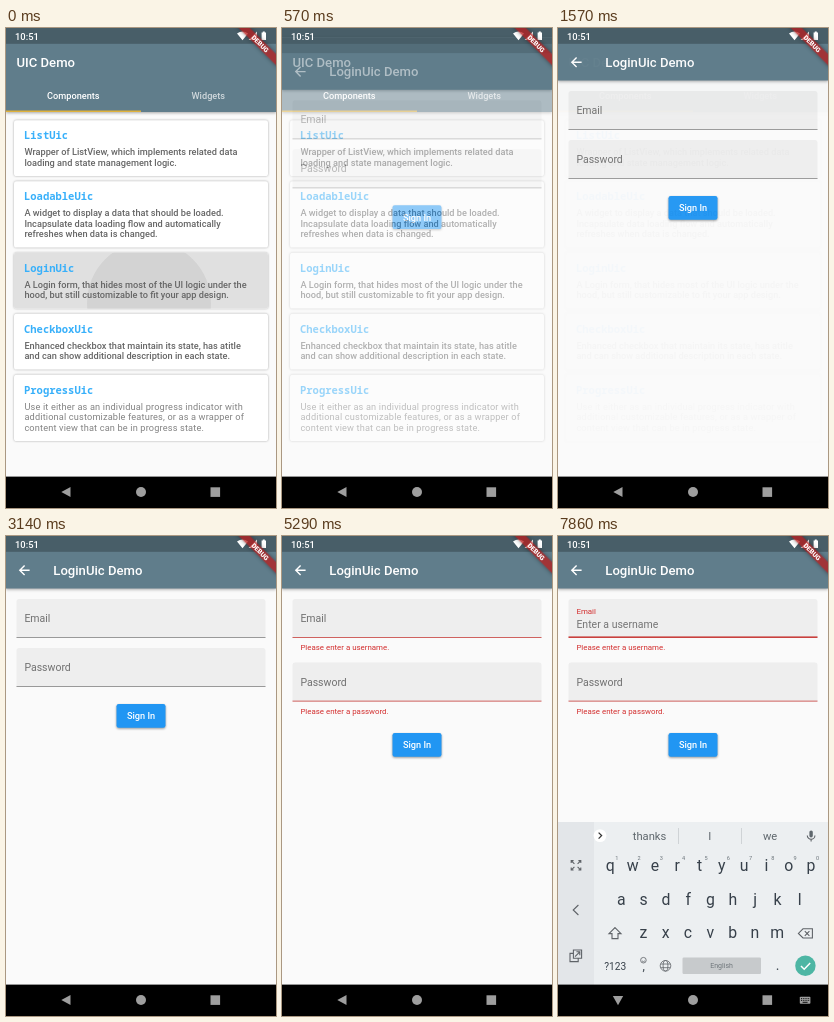
Write an HTML page that moves like this. It is 270x480 px and loops after 8000 ms.

```html
<!DOCTYPE html>
<html lang="en">
<head>
<meta charset="utf-8">
<title>UIC Demo</title>
<style>
html, body { margin: 0; width: 100%; height: 100%; overflow: hidden; background: #fafafa; }
svg { display: block; width: 270px; height: 480px; font-family: Roboto, sans-serif; }
.medium { font-weight: 500; }
.name { font: bold 10.5px "Noto Sans Mono", monospace; fill: #38b0fa; }
.title { font-size: 13.1px; font-weight: 500; fill: #fff; }
.bar { fill: #607d8b; filter: drop-shadow(0 1.5px 1.5px #0005); }
.card { fill: #fff; filter: drop-shadow(0 .7px .8px #0005); }
.line { fill: none; stroke: #5f6368; stroke-width: 1.1; }
</style>
</head>
<body>
<svg id="stage" viewBox="0 0 270 480"></svg>
<script>
const text = (x, y, size, fill, content, extra = '') =>
  `<text x="${x}" y="${y}" font-size="${size}" fill="${fill}" ${extra}>${content}</text>`;
const rect = (x, y, w, h, fill, extra = '') =>
  `<rect x="${x}" y="${y}" width="${w}" height="${h}" fill="${fill}" ${extra}/>`;
const path = (d, extra = '') => `<path d="${d}" ${extra}/>`;
const middle = 'text-anchor="middle"';
const medium = 'class="medium"';

const cards = [
  ['ListUic', 92.2, 'Wrapper of ListView, which implements related data', 'loading and state management logic.'],
  ['LoadableUic', 153.3, 'A widget to display a data that should be loaded.',
    'Incapsulate data loading flow and automatically', 'refreshes when data is changed.'],
  ['LoginUic', 224.8, 'A Login form, that hides most of the UI logic under the',
    'hood, but still customizable to fit your app design.'],
  ['CheckboxUic', 285.8, 'Enhanced checkbox that maintain its state, has atitle',
    'and can show additional description in each state.'],
  ['ProgressUic', 346.8, 'Use it either as an individual progress indicator with',
    'additional customizable features, or as a wrapper of', 'content view that can be in progress state.'],
];

function card([name, y, ...lines], i) {
  const box = [8, y, 254, 34.8 + lines.length * 10.5];
  const ink = i !== 2 ? '' : `<clipPath id="cardClip">${rect(...box, '#000', 'rx="2.6"')}</clipPath>
    <g id="cardInk" clip-path="url(#cardClip)">${rect(...box, '#e0e0e0')}
    <circle id="ripple" cx="143" cy="275" fill="#d3d3d3"/></g>`;
  const style = i < 4 ? medium : 'letter-spacing=".16"';
  return rect(...box, '#fff', 'class="card" rx="2.6"') + ink +
    `<text class="name" x="18" y="${y + 18.8}">${name}</text>` +
    lines.map((l, n) => text(18.4, y + 34.9 + n * 10.5, 9.2, i < 4 ? '#666' : '#838383', l, style)).join('');
}

const listPage = rect(0, 0, 270, 449, '#fafafa') + cards.map(card).join('') +
  rect(0, 0, 270, 84, '', 'class="bar"') + rect(0, 0, 270, 15.8, '#485e68') +
  '<text class="title" x="10.5" y="39">UIC Demo</text>' +
  text(67.3, 71.2, 9.2, '#fff', 'Components', medium + middle) +
  text(202.3, 71.2, 9.2, '#ffffffb3', 'Widgets', medium + middle) +
  rect(0, 82.5, 135, 1.5, '#e0b23c');

const field = (name, error) =>
  path('M10.5 102V65.6a2.6 2.6 0 0 1 2.6-2.6H256.9a2.6 2.6 0 0 1 2.6 2.6V102Z', 'fill="#eee"') +
  `<rect id="${name}Line" x="10.5" width="249"/>` +
  `<text id="${name}" x="18.4" y="86" fill="#717171" font-size="10.5">${name}</text>` +
  text(18.4, 114.3, 7.9, '#d32f2f', error, `id="${name}Error"`);

const loginPage = rect(0, 0, 270, 470, '#fafafa') +
  rect(0, 0, 270, 52.5, '', 'class="bar"') + rect(0, 0, 270, 15.8, '#485e68') +
  path('M23.6 34.3H14M18.6 29.5L13.8 34.3L18.6 39.1', 'fill="none" stroke="#fff" stroke-width="1.4"') +
  '<text class="title" x="47.3" y="39">LoginUic Demo</text>' +
  field('Email', 'Please enter a username.') +
  text(18.4, 91.5, 10.5, '#757575', 'Enter a username', 'id="hint"') +
  rect(18.4, 79, 1.3, 14, '#2196f3', 'id="cursor"') +
  `<g id="second">${field('Password', 'Please enter a password.')}</g>
  <clipPath id="buttonClip">${rect(110.5, 168, 49, 23.8, '#000', 'rx="2.2"')}</clipPath>
  <g id="button">${rect(110.5, 168, 49, 23.8, '#2196f3', 'id="face" rx="2.2"')}
  <g id="buttonInk" clip-path="url(#buttonClip)" fill="#fff">${rect(110, 168, 50, 24, '', 'opacity=".1"')}
  <circle id="splash" cx="135" cy="180" opacity=".12"/></g>
  ${text(135, 183.3, 9.2, '#fff', 'Sign In', medium + middle)}</g>`;

const statusIcons = text(9, 12.2, 9.4, '#fff', '10:51', medium) +
  path('M231 5.6Q236.5 1.6 242 5.6L236.5 12.3ZM251 3.4V12H242.6ZM255.6 4.4h1.2v-1h2v1h1.2V12h-4.4Z', 'fill="#fff"');

const banner = '<g transform="translate(270 0) rotate(45)">' +
  rect(-30, 18.4, 60, 7.9, '#b71c1c', 'opacity=".75" style="filter:drop-shadow(0 0 2px #0008)"') +
  text(0, 24.7, 6.6, '#fff', 'DEBUG', middle + ' font-weight="900"') + '</g>';

const navBar = rect(0, 448.6, 270, 32, '#000') + '<g fill="#9e9e9e">' +
  path('M64.5 459V469L55.3 464Z', 'id="back"') + path('M54.8 460H65.2L60 469.2Z', 'id="down"') +
  '<circle cx="135" cy="464" r="5"/>' + rect(204.5, 459.3, 9.6, 9.6, '', 'style="fill:inherit"') +
  `<g id="switcher">${rect(241.8, 460.7, 10.6, 7, '#9e9e9e', 'rx=".8"')}` +
  path('M243 462.6H251.4M243 464.4H251.4', 'stroke="#000" stroke-width=".9" stroke-dasharray="1 .8"') +
  path('M244.6 466.3H249.6', 'stroke="#000" stroke-width=".9"') + '</g></g>';

const keyRow = (keys, x, y) => [...keys].map((k, i) =>
  text(x + i * 22.3, y, 15.8, '#37404a', k, middle)).join('');

const keyboard = rect(0, 286, 270, 163, '#eceff1') + rect(0, 286, 36, 163, '#e3e6e9') +
  '<circle cx="42" cy="299.6" r="6.4" fill="#fff"/>' +
  path('M40.6 296.6L43.6 299.6L40.6 302.6', 'fill="none" stroke="#333" stroke-width="1.3"') +
  ['thanks', 'I', 'we'].map((w, i) => text(91.5 + i * 60.3, 303.8, 11.2, '#5f676d', w, middle)).join('') +
  path('M120.5 292V308M183.5 292V308', 'stroke="#cfd3d6" stroke-width="1"') +
  rect(251.4, 294.4, 3.4, 7, '#5f676d', 'rx="1.7"') +
  path('M249.3 299.5a3.8 3.8 0 0 0 7.6 0M253.1 303.2V305.6', 'class="line"') +
  keyRow('qwertyuiop', 52.3, 335.4) + keyRow('asdfghjkl', 63.3, 368.6) + keyRow('zxcvbnm', 85.4, 402.4) +
  [...'1234567890'].map((d, i) => text(58.8 + i * 22.3, 323.6, 5.6, '#6b747a', d, middle)).join('') +
  path('M57 391.6L63 397.6H60V402.6H54V397.6H51ZM245 392.8H254.4V402H245L240.4 397.4ZM246.8 395.2L251.4 399.8M251.4 395.2L246.8 399.8', 'class="line"') +
  text(57.3, 433.6, 10.2, '#37404a', '?123', middle) + text(85.6, 434, 12, '#37404a', ',', middle) +
  '<g class="line" style="stroke-width:.8"><circle cx="85.4" cy="424.2" r="2.8"/>' +
  '<circle cx="107.5" cy="429.8" r="5.3"/><ellipse cx="107.5" cy="429.8" rx="2.4" ry="5.3"/>' +
  path('M102.8 428H112.2M102.8 431.7H112.2M83.9 424.8Q85.4 426.6 86.9 424.8') + '</g>' +
  rect(124.5, 421.5, 78.5, 16.4, '#c7cacc', 'rx="1.2"') + text(163.6, 432.3, 7, '#70777c', 'English', middle) +
  text(219.6, 434, 14, '#37404a', '.', middle) +
  '<circle cx="247.4" cy="429.8" r="10.2" fill="#4db6a4"/>' +
  path('M243 430L246.2 433.2L252.2 427', 'fill="none" stroke="#fff" stroke-width="1.5"') +
  path('M13.2 327V324.6H15.6M20.4 324.6H22.8V327M22.8 331.6V334H20.4M15.6 334H13.2V331.6M13.4 324.8L16.4 327.8M22.6 324.8L19.6 327.8M22.6 333.8L19.6 330.8M13.4 333.8L16.4 330.8M20.4 369L15.2 374L20.4 379M15.4 417.4H12V425.6H20.2V422.2M15.4 414H23.6V422.2H15.4ZM17 420.6L21.8 415.8M18.4 415.8H21.8V419.2', 'class="line"');

document.getElementById('stage').innerHTML = listPage + `<g id="login">${loginPage}</g>` +
  `<g id="keyboard">${keyboard}</g>` + statusIcons + banner + navBar;

const part = {};
document.querySelectorAll('#stage [id]').forEach(el => part[el.id] = el);
const set = (id, attrs) => { for (const k in attrs) part[id].setAttribute(k, attrs[k]); };
const progress = (t, from, to) => Math.min(1, Math.max(0, (t - from) / (to - from)));
const mix = (a, b, p) => a + (b - a) * p;

function bezier(x1, y1, x2, y2) {
  const at = (a, b, s) => 3 * a * s * (1 - s) ** 2 + 3 * b * s * s * (1 - s) + s ** 3;
  return x => {
    let lo = 0, hi = 1;
    for (let i = 0; i < 24; i++) {
      const mid = (lo + hi) / 2;
      if (at(x1, x2, mid) < x) lo = mid; else hi = mid;
    }
    return at(y1, y2, lo);
  };
}
const fastOutSlowIn = bezier(.4, 0, .2, 1);
const easeIn = bezier(.42, 0, 1, 1);

function draw(t) {
  // Tapped card and page transition
  set('ripple', { r: 62 + 150 * progress(t, 100, 420) });
  set('cardInk', { opacity: 1 - progress(t, 250, 520) });
  const push = progress(t, 370, 670);
  set('login', {
    opacity: easeIn(push) * mix(.97, 1, progress(t, 1860, 2300)),
    transform: `translate(0 ${120 * (1 - fastOutSlowIn(push))})`,
  });

  // Button press, then validation messages
  const press = progress(t, 3570, 3770) * (1 - progress(t, 4440, 4760));
  set('splash', { r: 30 * progress(t, 3570, 4300) });
  set('buttonInk', { opacity: press });
  part.face.style.filter = `drop-shadow(0 ${mix(1, 3, press)}px ${mix(1, 2.5, press)}px #0006)`;
  const error = fastOutSlowIn(progress(t, 4440, 4620));
  set('second', { transform: `translate(0 ${49 + 14.5 * error})` });
  set('button', { transform: `translate(0 ${29 * error})` });

  // Focus and keyboard
  const focused = t >= 7430;
  const float = fastOutSlowIn(progress(t, 7430, 7640));
  for (const name of ['Email', 'Password']) {
    const thick = name === 'Email' ? mix(.8, 1.6, float) : .8;
    set(name + 'Error', { opacity: error });
    set(name + 'Line', { y: 102 - thick, height: thick, fill: error > .3 ? '#c9403d' : '#858585' });
  }
  set('Email', { y: mix(86, 78.3, float), 'font-size': mix(10.5, 7.9, float), fill: float > .3 ? '#d32f2f' : '#717171' });
  set('hint', { opacity: float });
  set('cursor', { opacity: focused && t < 7800 ? 1 : 0 });
  set('keyboard', { transform: `translate(0 ${170 * (1 - fastOutSlowIn(progress(t, 7480, 7780)))})` });
  set('back', { opacity: focused ? 0 : 1 });
  set('down', { opacity: focused ? 1 : 0 });
  set('switcher', { opacity: focused ? 1 : 0 });
}

const start = performance.now();
function tick() {
  draw((performance.now() - start) % 8000);
  requestAnimationFrame(tick);
}
tick();
</script>
</body>
</html>
```
